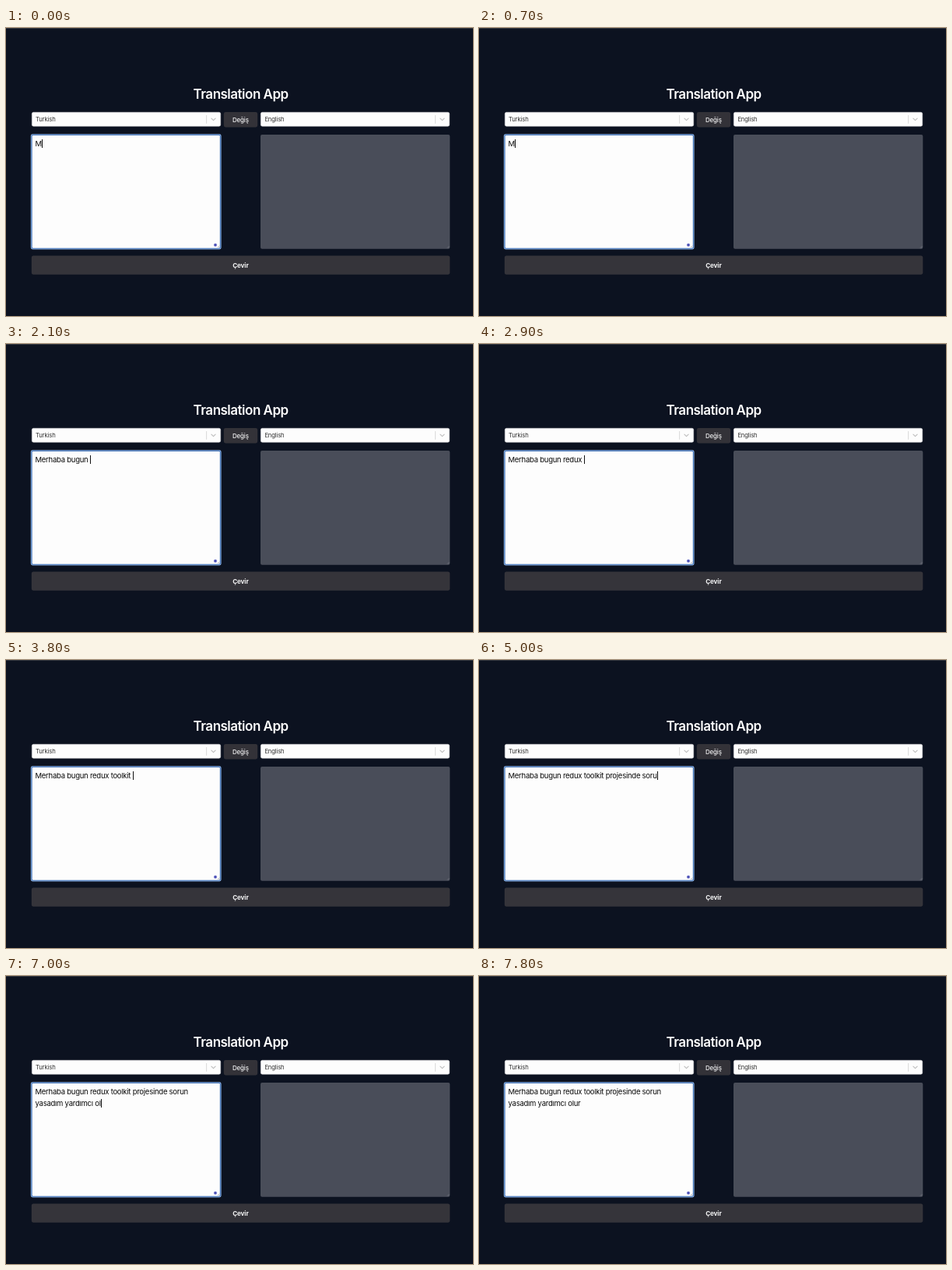
Recreate the animation shown at these times as an HTML page. Size 600 by 370 pixels, loop 8000 ms.

```html
<!DOCTYPE html>
<html lang="tr">
<head>
<meta charset="utf-8">
<title>Translation App</title>
<style>
  html, body { margin: 0; width: 100%; height: 100%; overflow: hidden; background: #0c1220; }
  #stage { position: relative; width: 600px; height: 370px; overflow: hidden; }
  svg { position: absolute; left: 0; top: 0; }
  text, #typed { font-family: Inter, "Liberation Sans", sans-serif; font-optical-sizing: none; }
  .title { font-size: 17px; font-weight: 600; letter-spacing: -.5px; fill: #fff; text-anchor: middle; }
  .option { font-size: 7.7px; letter-spacing: -.16px; fill: #303030; }
  .button { font-size: 7.9px; font-weight: 500; letter-spacing: -.1px; fill: #f4f4f5; text-anchor: middle; }
  .submit { font-size: 8.1px; font-weight: 700; }
  #typed {
    position: absolute; left: 37.5px; top: 142.3px;
    font-size: 9.5px; line-height: 14.6px; letter-spacing: -.25px;
    color: #0a0a0a; white-space: pre;
  }
  #caret {
    display: inline-block; width: .8px; height: 11px; margin: 0 -.8px 0 .2px;
    vertical-align: -2px; background: #111;
  }
</style>
</head>
<body>
<div id="stage">
  <svg width="600" height="370" viewBox="0 0 600 370">
    <defs>
      <g id="select">
        <rect x=".3" y=".3" width="242.4" height="17.9" rx="2" fill="#fdfdfd" stroke="#cfcfd2" stroke-width=".6"/>
        <path d="M224.6 4v10.8" stroke="#cccccc" stroke-width=".7"/>
        <path d="M230.9 8.2l2.6 2.5l2.6-2.5" fill="none" stroke="#bcbcbc" stroke-width="1.1" stroke-linecap="round" stroke-linejoin="round"/>
      </g>
    </defs>
    <rect width="600" height="370" fill="#0c1220"/>
    <rect width="600" height="1" fill="#34373f"/>

    <text class="title" x="301.6" y="91.2">Translation App</text>

    <use href="#select" x="33" y="108"/>
    <text class="option" x="38" y="120.2">Turkish</text>
    <use href="#select" x="327" y="108"/>
    <text class="option" x="332.4" y="120.2">English</text>

    <rect x="279.8" y="108" width="43.4" height="19.4" rx="2.4" fill="#333238"/>
    <text class="button" x="301.4" y="120.8">Değiş</text>

    <rect x="31.8" y="136.3" width="244.8" height="148.2" rx="2.4" fill="#8db3e3"/>
    <rect x="32.7" y="137.2" width="243" height="146.4" rx="1.8" fill="#2c61ad"/>
    <rect x="33.6" y="138.1" width="241.2" height="144.6" rx="1.2" fill="#fdfdfd"/>
    <circle cx="269" cy="278.7" r="2.3" fill="#c5c7ee"/>
    <circle cx="269" cy="278.7" r="1.7" fill="#4a4fb5"/>
    <path d="M271.8 282l2.5-2.5M273.3 282l1-1" stroke="#8a8a8a" stroke-width=".5"/>

    <rect x="327" y="137" width="243.3" height="146.7" rx="2" fill="#494d59"/>
    <path d="M567 282.6l2.4-2.4M568.5 282.6l.9-.9" stroke="#8b8e96" stroke-width=".5"/>

    <rect x="32.8" y="292.5" width="537.5" height="24.2" rx="2.6" fill="#35343a"/>
    <text class="button submit" x="301.4" y="307.6">Çevir</text>
  </svg>
  <div id="typed"><span id="text"></span><span id="caret"></span></div>
</div>
<script>
  const LOOP = 8000, TICK = 100;
  const MESSAGE = "Merhaba bugun redux toolkit projesinde sorun yasadım yardımcı olurmu";
  const WRAP_AT = MESSAGE.indexOf("yasadım");
  const WRAP_FROM = WRAP_AT + "yasadım".length; // the word drops once it no longer fits
  const LAST_WORD = MESSAGE.indexOf("olurmu");
  const ERASE_TICK = 75;

  // Typing bursts: start tick, then letters added on each tick.
  const BURSTS = [
    [0, "1"],
    [9, "111211"],
    [17, "11211"],
    [25, "11121"],
    [31, "1111111111111212111211111211111111211"],
    [69, "11112"],
    [76, "121"]
  ];

  const added = Array(LOOP / TICK).fill(0);
  for (const [start, letters] of BURSTS)
    [...letters].forEach((n, i) => added[start + i] = +n);

  let total = 0;
  const counts = added.map((n, tick) =>
    total = tick === ERASE_TICK ? LAST_WORD : total + n);

  const caretShown = tick => !(tick === 23 || tick === 24 || tick >= 78);

  const text = document.getElementById("text");
  const caret = document.getElementById("caret");
  let shown = -1;

  function draw(tick) {
    if (tick === shown) return;
    shown = tick;
    const n = counts[tick];
    text.textContent = n < WRAP_FROM
      ? MESSAGE.slice(0, n)
      : MESSAGE.slice(0, WRAP_AT) + "\n" + MESSAGE.slice(WRAP_AT, n);
    caret.style.visibility = caretShown(tick) ? "visible" : "hidden";
  }

  const began = performance.now();
  function frame() {
    draw(Math.floor((performance.now() - began) % LOOP / TICK));
    requestAnimationFrame(frame);
  }
  draw(0);
  requestAnimationFrame(frame);
</script>
</body>
</html>
```
